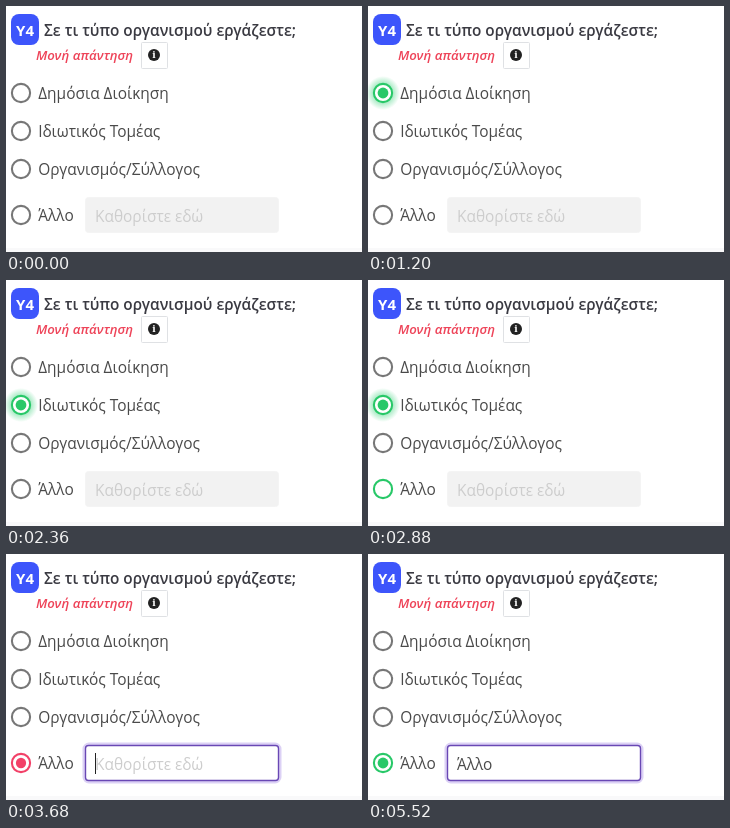
Recreate the animation shown at these times as an HTML page. Size 356 by 246 pixels, loop 5.6 s.

```html
<!DOCTYPE html>
<html lang="el">
<head>
<meta charset="utf-8">
<style>
  html, body { margin: 0; width: 356px; height: 246px; overflow: hidden; background: #fff; }
  svg { display: block; }
  text { font: 15.45px "Open Sans", "Noto Sans", sans-serif; fill: #4a4a4a; }
  .title { font-weight: 600; font-size: 15.3px; fill: #3a3a42; }
  .badge { font-weight: 700; font-size: 15px; fill: #fff; text-anchor: middle; }
  .hint { font-size: 13.2px; font-weight: 600; font-style: italic; fill: #ee4459; }
  .info { font: 700 9px "DejaVu Serif", serif; fill: #fff; text-anchor: middle; }
</style>
</head>
<body>
<svg width="356" height="246" viewBox="0 0 356 246">
  <defs>
    <radialGradient id="glow">
      <stop offset=".5" stop-color="#3ad07a" stop-opacity=".5"/>
      <stop offset="1" stop-color="#3ad07a" stop-opacity="0"/>
    </radialGradient>
  </defs>
  <rect y="242" width="356" height="4" fill="#f9f9fa"/>
  <rect x="5" y="8" width="28" height="31" rx="8" fill="#3d55fb"/>
  <text class="badge" x="19" y="30">Υ4</text>
  <text class="title" x="38" y="30">Σε τι τύπο οργανισμού εργάζεστε;</text>
  <text class="hint" x="30" y="53.5">Μονή απάντηση</text>
  <rect x="135.5" y="36.5" width="26" height="26" rx="1" fill="#fff" stroke="#dfe1e4"/>
  <circle cx="148" cy="49" r="6" fill="#222"/>
  <text class="info" x="148" y="52.3">i</text>
  <g id="options"></g>
  <rect id="halo" x="78" y="190" width="196" height="38" rx="5" fill="none" stroke="#b9a4ec" stroke-width="3"/>
  <rect id="field" x="79.5" y="191.5" width="193" height="35" rx="3"/>
  <text id="entry" x="89" y="215.5"></text>
  <path id="caret" stroke="#222"/>
  <circle id="ripple" fill="none" stroke="#c00a14" stroke-width="1.2"/>
</svg>
<script>
const LOOP = 5600, FADE = 150;
const GREY = [119, 119, 119], GREEN = [40, 200, 104], PINK = [242, 65, 104];
const PICK = [670, 1850, 3560], FOCUS = 3580;
const KEYS = [4330, 4540, 4760, 4990];
const CLICKS = [[640, 21, 85.5], [1820, 18.5, 130], [3530, 130, 209]];

const $ = id => document.getElementById(id);
const set = (el, attrs) => { for (const k in attrs) el.setAttribute(k, attrs[k]); };
const ease = (t, start, length = FADE) => {
  const p = Math.min(1, Math.max(0, (t - start) / length));
  return p * p * (3 - 2 * p);
};
const mix = (a, b, p) => a.map((v, i) => v + (b[i] - v) * p);
const rgb = c => `rgb(${c.map(Math.round)})`;
// Runs through [time, colour] steps, fading into each one.
const fadeColor = (t, from, ...steps) =>
  rgb(steps.reduce((c, [start, to]) => mix(c, to, ease(t, start)), from));

// on/off: when each option is checked and released
const options = [
  { label: "Δημόσια Διοίκηση", y: 87, on: PICK[0], off: PICK[1],
    ring: [[400, PINK], [PICK[0] + 30, GREEN], [PICK[1] - 70, GREY]] },
  { label: "Ιδιωτικός Τομέας", y: 125, on: PICK[1], off: PICK[2],
    ring: [[1500, GREEN], [PICK[2] - 70, GREY]] },
  { label: "Οργανισμός/Σύλλογος", y: 163, on: LOOP, off: LOOP, ring: [] },
  { label: "Άλλο", y: 209, on: PICK[2], off: LOOP, typed: true,
    ring: [[2680, GREEN], [PICK[2] - 30, PINK], [KEYS[0], GREEN]] }
];

$("options").innerHTML = options.map(({ label, y }) => `
  <circle cx="15" cy="${y}" r="17" fill="url(#glow)"/>
  <circle cx="15" cy="${y}" r="9.1" fill="#fff" stroke-width="2.1"/>
  <circle cx="15" cy="${y}"/>
  <text x="32.3" y="${y + 6}">${label}</text>`).join("");
const rows = [...$("options").querySelectorAll("text")].map(label => {
  const dot = label.previousElementSibling, ring = dot.previousElementSibling;
  return { dot, ring, glow: ring.previousElementSibling };
});

function drawOptions(t) {
  options.forEach(({ on, off, ring, typed }, i) => {
    const checked = ease(t, on, 140) - ease(t, off, 140);
    const focused = typed ? 0 : ease(t, on, 100) - ease(t, off, 100);
    const row = rows[i];
    set(row.glow, { opacity: focused });
    set(row.ring, { stroke: fadeColor(t, GREY, ...ring) });
    set(row.dot, {
      r: 5.4 * checked,
      fill: typed ? fadeColor(t, PINK, [KEYS[0], GREEN]) : rgb(GREEN)
    });
  });
}

function drawField(t) {
  const open = ease(t, FOCUS, 90);
  const keys = KEYS.filter(k => t >= k);
  const typed = "Άλλο".slice(0, keys.length);
  set($("halo"), { opacity: open * 0.5 });
  set($("field"), {
    fill: rgb(mix([242, 242, 242], [255, 255, 255], open)),
    stroke: rgb(mix([244, 244, 244], [105, 72, 180], open)),
    "stroke-width": 1 + open * 0.4
  });
  const entry = $("entry");
  entry.textContent = typed || "Καθορίστε εδώ";
  entry.style.fill = typed ? "#4a4a4a" : "#cdcdcd";

  const lastInput = Math.max(FOCUS, ...keys);
  const shown = t >= FOCUS && Math.floor((t - lastInput) / 530) % 2 === 0;
  const x = Math.round(89 + (typed ? entry.getComputedTextLength() : 0)) + 0.5;
  set($("caret"), { d: `M${x} 199V220`, opacity: shown ? 1 : 0 });
}

function drawRipple(t) {
  const click = CLICKS.find(([start]) => t >= start && t < start + 120);
  const [start, cx, cy] = click || [t, 0, 0];
  set($("ripple"), { cx, cy, r: 0.28 * (t - start), opacity: click ? 1 : 0 });
}

function frame(now) {
  const t = now % LOOP;
  drawOptions(t);
  drawField(t);
  drawRipple(t);
  requestAnimationFrame(frame);
}
requestAnimationFrame(frame);
</script>
</body>
</html>
```
